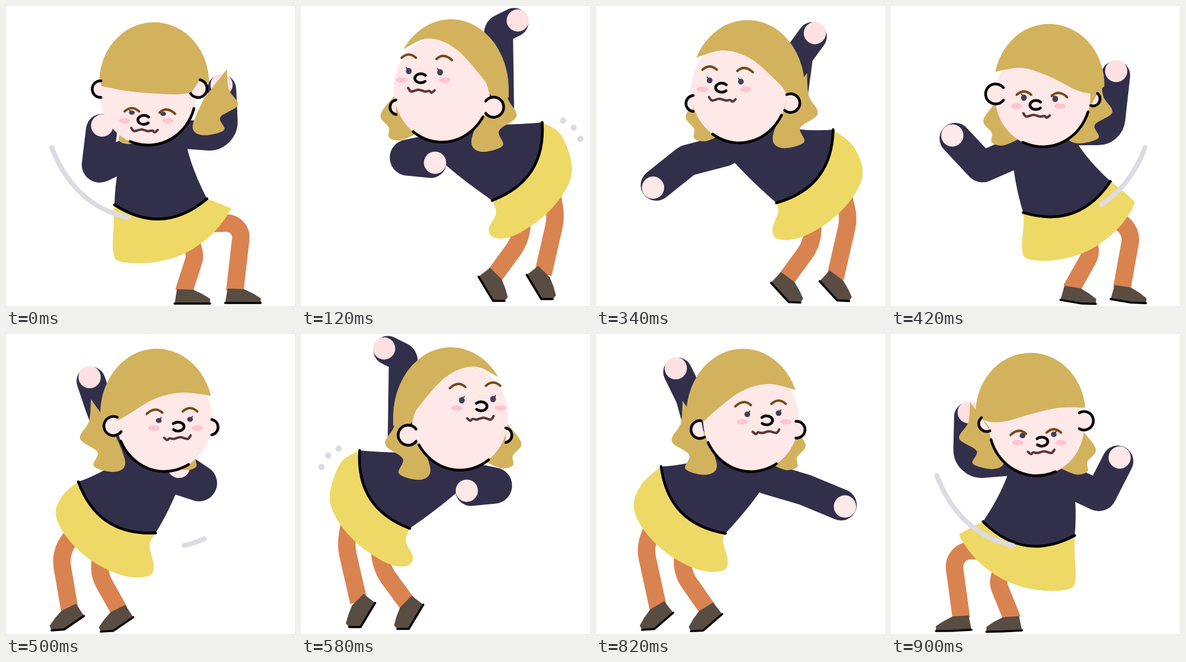
An HTML page with a canvas for the animation above (0.92 s loop, 480 px wide and 498 px high).

```html
<!DOCTYPE html>
<html lang="en">
<head>
<meta charset="utf-8">
<title>Dance</title>
<style>
html, body { margin: 0; width: 100%; height: 100%; overflow: hidden; background: #fff; }
canvas { display: block; width: 480px; height: 498px; }
</style>
</head>
<body>
<canvas id="stage" width="480" height="498"></canvas>
<script>
const ctx = document.getElementById('stage').getContext('2d');
const { PI, sin, cos, max, min } = Math;
const SPAN = 498, HALF = 460, STEP = 20;
const SHIRT = '#322f4b', SKIRT = '#eed967', HAIR = '#d2b25d', SKIN = '#ffe8e8', PALM = '#ffe1e1',
  LEG = '#d98350', SHOE = '#594c42', BLUSH = '#ffc4d0', EYE = '#454058', BROW = '#754b14',
  MOUTH = '#5e3434', SWISH = '#dcdbe4', INK = '#000';

const easeIn = k => k * k;
const easeOut = k => 1 - (1 - k) ** 2;
const smooth = k => k * k * (3 - 2 * k);

// Half a dance; the other half is its mirror image. lift: 0 crouched, 1 thrown forward.
// hips: x, y, tilt. fore: angle of the front forearm. elbow, hand: back arm.
const keys = [
  { at: 0, ease: easeOut, lift: 0, yaw: -0.4, head: [236, 148], hips: [257, 325, -0.065],
    elbow: [362, 218], hand: [358, 131], fore: -1.45 },
  { at: 120, ease: smooth, lift: 1, yaw: -1.2, head: [234, 138], hips: [359, 258, -1],
    elbow: [328, 40], hand: [360, 24], fore: 0.1 },
  { at: 260, ease: easeIn, lift: 1, yaw: -1.2, head: [233, 137], hips: [365, 249, -1.1],
    elbow: [328, 40], hand: [360, 24], fore: 1.97 },
  { at: 420, ease: k => k, lift: 0.15, yaw: 1, head: [252, 150], hips: [292, 317, -0.344],
    elbow: [363, 207], hand: [374, 108], fore: 3.96 },
  { at: 440, lift: 0.05, yaw: 0.4, head: [256, 152], hips: [269, 323, -0.15],
    elbow: [371, 217], hand: [369, 130], fore: 4.24 }
];

const mix = (a, b, k) => Array.isArray(a) ? a.map((v, i) => mix(v, b[i], k)) : a + (b - a) * k;

function poseAt(u) {
  const i = keys.findLastIndex(key => key.at <= u);
  const from = keys[i], to = keys[i + 1];
  if (!to) return from;
  const k = from.ease((u - from.at) / (to.at - from.at));
  const pose = {};
  for (const part in from) if (part !== 'ease') pose[part] = mix(from[part], to[part], k);
  return pose;
}

const add = (p, dx, dy) => [p[0] + dx, p[1] + dy];
const shift = (points, x, y) => points.map(p => add(p, x, y));

// Adds a smooth open curve through the points to the current path.
function curve(p) {
  const at = i => p[max(0, min(p.length - 1, i))];
  ctx.lineTo(...p[0]);
  for (let i = 0; i < p.length - 1; i++) {
    const [a, b, c, d] = [at(i - 1), at(i), at(i + 1), at(i + 2)];
    ctx.bezierCurveTo(b[0] + (c[0] - a[0]) / 6, b[1] + (c[1] - a[1]) / 6,
      c[0] - (d[0] - b[0]) / 6, c[1] - (d[1] - b[1]) / 6, ...c);
  }
}
function fill(color, trace) {
  ctx.beginPath();
  trace();
  ctx.fillStyle = color;
  ctx.fill();
}
function line(color, width, trace) {
  ctx.beginPath();
  trace();
  ctx.strokeStyle = color;
  ctx.lineWidth = width;
  ctx.stroke();
}
const oval = (color, x, y, rx, ry = rx) => fill(color, () => ctx.ellipse(x, y, rx, ry, 0, 0, 7));
const polygon = points => points.forEach(p => ctx.lineTo(...p));

function limb(color, width, from, joint, to, radius) {
  line(color, width, () => {
    ctx.moveTo(...from);
    ctx.arcTo(...joint, ...to, radius);
    ctx.lineTo(...to);
  });
}

function drawArm(shoulder, elbow, hand, width, radius, color) {
  const angle = Math.atan2(hand[1] - elbow[1], hand[0] - elbow[0]);
  const cuff = add(hand, -7 * cos(angle), -7 * sin(angle));
  limb(SHIRT, width, shoulder, elbow, cuff, radius);
  oval(color, ...hand, 18.5);
}

function drawShoe([x, y], lift) {
  const sole = [[42, 23], [15 + 13 * lift, 23 + 13 * lift], [-17, 23]];
  ctx.save();
  ctx.translate(x, y);
  ctx.rotate(0.75 * lift);
  fill(SHOE, () => polygon([[-13, -1], [14, 0], [29, 7], [42, 15], ...sole]));
  line(INK, 3.5, () => polygon(sole));
  ctx.restore();
}

function drawLegs({ lift, hips: [x, y] }) {
  const ankleL = [297 + 26 * lift, 471 - 27 * lift];
  const ankleR = add(ankleL, 84 - 4 * lift, -1 - 2 * lift);
  const kneeL = [314 + (x - 257) * 0.53, 416 - 32 * lift];
  const kneeR = [393 + (x - 257) * 0.3, 359 - 8 * lift];
  const hipL = add(kneeL, 5 * lift - 6, -24 - 8 * lift);
  const hipR = [x + 88 - 30 * lift, y + 36 + 18 * lift];
  const radius = 24 + 60 * lift;
  ctx.lineCap = 'butt';
  limb(LEG, 29, hipL, kneeL, add(ankleL, -2, 4), radius);
  limb(LEG, 29, hipR, kneeR, add(ankleR, -1, 4), radius);
  ctx.lineCap = 'round';
  drawShoe(ankleL, lift);
  drawShoe(ankleR, lift);
}

const skirtLow = [[110, 8], [115, 15], [84, 55], [37, 87], [-16, 101], [-68, 99], [-79, 81], [-78, 35]];
const skirtHigh = [[73, -44], [91, 9], [79, 50], [43, 92], [-5, 123], [-37, 127], [-47, 112], [-35, 86]];

function drawBody({ lift, hips: [x, y, tilt] }) {
  const along = [cos(tilt), sin(tilt)], down = [-along[1], along[0]];
  const start = [x - 77 * along[0], y - 77 * along[1]];
  const end = [x + 77 * along[0], y + 77 * along[1]];
  const left = [201, 216 + 10 * lift], right = [296, 206 - 10 * lift];
  const hem = () => {
    ctx.lineTo(...start);
    ctx.quadraticCurveTo(x + 57 * down[0], y + 57 * down[1], ...end);
  };
  const length = Math.hypot(x - 248, y - 210);
  const spine = [(x - 248) / length, (y - 210) / length];
  const waist = (p, drop, out) =>
    add(p, drop * spine[0] + out * along[0], drop * spine[1] + out * along[1]);

  fill(SKIRT, () => {
    hem();
    curve([end, ...shift(mix(skirtLow, skirtHigh, lift), x, y), start]);
  });
  fill(SHIRT, () => {
    hem();
    ctx.quadraticCurveTo(...waist(right, 48, 20 * lift), ...right);
    ctx.lineTo(...left);
    ctx.quadraticCurveTo(...waist(left, 55, -24), ...start);
  });
  line(INK, 4.5, hem);
}

function drawFrontArm({ lift, fore }) {
  const elbow = [151, 270 - 17 * lift];
  const hand = add(elbow, 72 * cos(fore), 72 * sin(fore));
  drawArm([214, 240], elbow, hand, 52, 4, SKIN);
}

const lockR = [[106, -25], [109, 14], [124, 45], [95, 69], [101, 94], [66, 104], [49, 87], [68, 32]];
const lockL = [[-79, 11], [-102, 43], [-88, 64], [-88, 80], [-69, 85], [-42, 74]];
const fringeLow = [[82, -8], [52, -4], [7, -10], [-38, -17]];
const fringeHigh = [[82, 10], [70, -15], [23, -67], [-23, -84]];

function drawEar(x, y, r, facing, turn) {
  const gap = min(1.75, 1.75 - (r - 13) * 0.3);
  const arc = () => ctx.arc(x, y, r, facing + gap + turn, facing + 2 * PI - gap + turn);
  fill(SKIN, arc);
  line(INK, 4.5, arc);
}

function drawFace({ lift, yaw }) {
  const x = -1 - 28 * lift, y = mix(24 - 15 * yaw, -29, lift);
  const squash = 0.9 + 0.1 * lift, drop = 18 - 20 * lift;
  const open = mix(0.75 + 0.25 * yaw, 1, lift);
  for (const side of [-1, 1]) {
    const ex = x + side * 26, ey = y + side;
    oval(BLUSH, x - 2 + side * 36, y + 14 * squash, 9.5, 4.5);
    oval(EYE, ex, ey, 4.8, 5.3 * open);
    line(EYE, 2, () => polygon([[ex - 4, ey - 6 * open], [ex - 2, ey - 3 * open]]));
    const lean = side > 0 ? 6 : 0;
    line(BROW, 4, () => {
      ctx.moveTo(ex - 12 + lean, ey + drop - 20);
      ctx.quadraticCurveTo(ex + lean, ey + drop - 31, ex + 12 + lean * 1.3, ey + drop - 20 + lean / 3);
    });
  }
  line(INK, 4.5, () => ctx.ellipse(x - 6, y + 11, 10, 7.5, 0, 0.75, 5.6));
  const mouth = [[-27, 27], [-22, 33], [-10, 30], [1, 33], [8, 32], [12, 35], [17, 31]];
  line(MOUTH, 4, () => curve(mouth.map(([mx, my]) => [x + mx, y + my * squash])));
}

function drawHead({ lift, yaw, head }) {
  const low = 1 - lift, brim = 0.15 * yaw * low;
  ctx.save();
  ctx.translate(...head);
  fill(HAIR, () => curve(shift(lockL, low * (4 + 90 * max(0, -yaw)), -4 * low)));
  fill(HAIR, () => curve(lockR.map(([x, y]) =>
    [x + 25 * low * (0.6 - yaw), y * (1 - 0.15 * low) - low * (20 - 5 * yaw)])));
  oval(SKIN, 0, 0, 79 + lift, 83 + 5 * lift);
  fill(HAIR, () => {
    const cx = 10 + 5 * lift, cy = -22 * low, rx = 91 + 5 * lift, ry = 99 + 17 * lift;
    const from = PI + 0.61 * lift + brim;
    ctx.ellipse(cx, cy, rx, ry, 0, from, 2 * PI);
    const fringe = mix(fringeLow, fringeHigh, lift)
      .map(([x, y], i) => [x, y - 160 * brim * smooth(i / 3)]);
    curve([[cx + rx, cy + 14 * lift], ...fringe, [cx + rx * cos(from), cy + ry * sin(from)]]);
  });
  line(INK, 4.5, () =>
    ctx.ellipse(0, 0, 79 + lift, 83 + 5 * lift, 0, 0.27 + 0.28 * lift, 1.96 + 0.25 * lift));
  drawEar(-79 + 5 * lift, -10 + 40 * lift, 14.6 + 2 * yaw, 0, 0);
  drawEar(83 + 3 * lift, -8 + 38 * lift + 50 * brim, 14 - 2.2 * yaw, PI, 0.6 * low);
  drawFace({ lift, yaw });
  ctx.restore();
}

// Trimmed sweep beside the hips.
function drawSwish(from, to, mirrored) {
  const bend = (a, b, c, t) => mix(mix(a, b, t), mix(b, c, t), t);
  line(SWISH, 8, () => {
    for (let i = 0; i <= 20; i++) {
      const t = mix(from, to, i / 20), x = bend(76, 113, 202, t);
      ctx.lineTo(mirrored ? SPAN - x : x, bend(235, 331, 351, t));
    }
  });
}

function drawDots(u) {
  const radius = 48 + 18 * easeOut(min(1, (u - 120) / 140));
  for (const angle of [-1.2, -0.76, -0.3])
    oval(SWISH, 418 + radius * cos(angle), 235 + radius * sin(angle), 5.2);
}

function drawDancer(u) {
  const pose = poseAt(u), { lift } = pose;
  drawArm([297 + 33 * lift, 213 - 38 * lift], pose.elbow, pose.hand, 48, 24 - 16 * lift, PALM);
  drawLegs(pose);
  drawBody(pose);
  drawFrontArm(pose);
  drawHead(pose);
  if (u >= 80 && u <= 300) drawDots(u);
  if (u < 50) drawSwish(u / 50, 1, false);
  if (u > 380) drawSwish(0, (u - 380) / 60, true);
}

function render(now) {
  const time = Math.floor(now % (2 * HALF) / STEP) * STEP;
  ctx.setTransform(1, 0, 0, 1, 0, 0);
  ctx.fillStyle = '#fff';
  ctx.fillRect(0, 0, 480, 498);
  if (time >= HALF) ctx.setTransform(-1, 0, 0, 1, SPAN, 0);
  ctx.lineCap = ctx.lineJoin = 'round';
  drawDancer(time % HALF);
}

const start = performance.now();
function tick() {
  render(performance.now() - start);
  requestAnimationFrame(tick);
}
tick();
</script>
</body>
</html>
```
